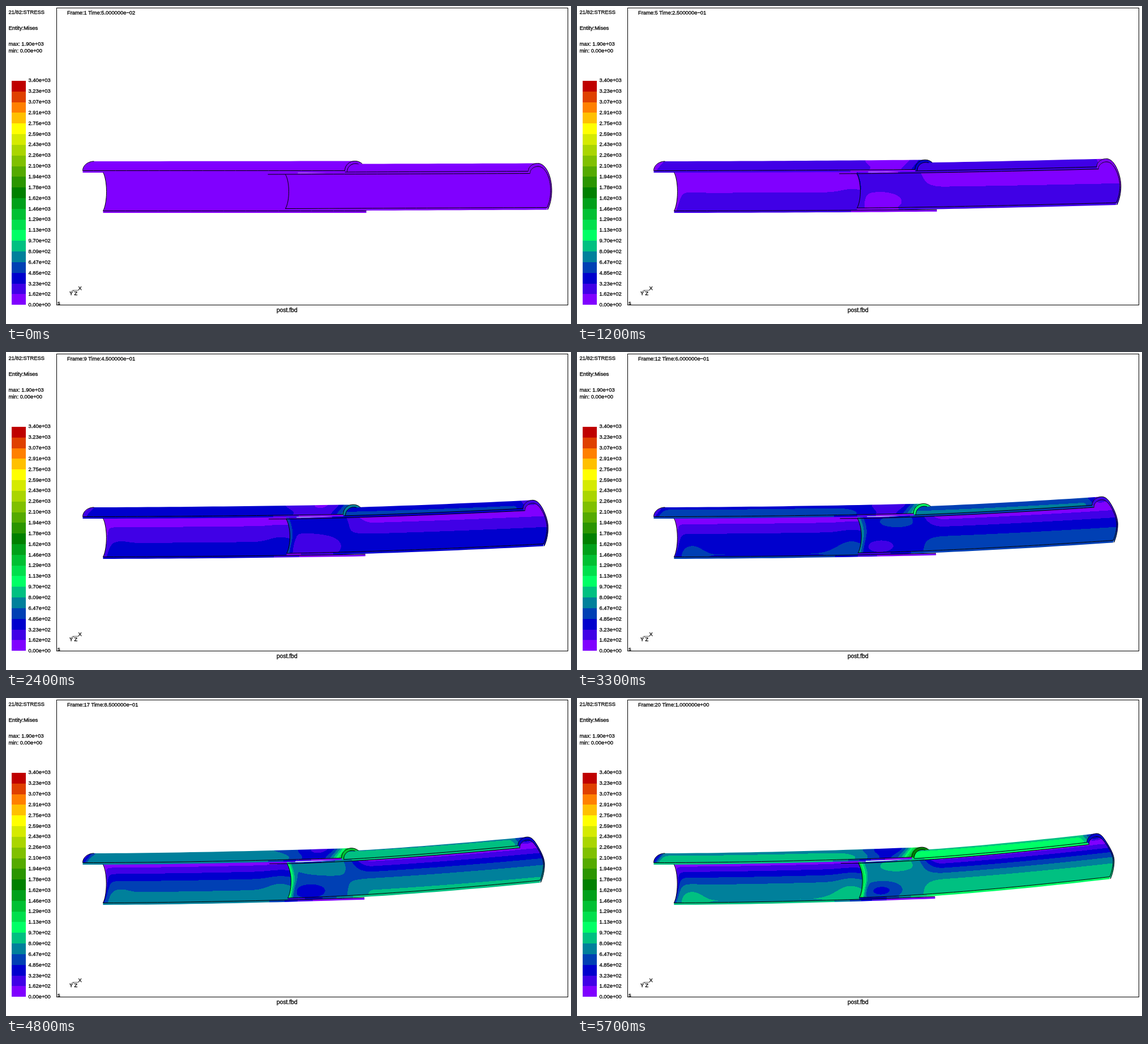
Animation of 998x561 px, one loop 6 s. Source, as an HTML page with a canvas:

```html
<!DOCTYPE html>
<html lang="en">
<head>
<meta charset="utf-8">
<title>Mises stress</title>
<style>
html, body { margin: 0; width: 100%; height: 100%; overflow: hidden; background: #fff; }
canvas, svg { position: absolute; left: 0; top: 0; width: 998px; height: 561px; }
text { font-family: "Liberation Sans", Arial, sans-serif; font-size: 9.35px; fill: #000; stroke: #000; stroke-width: .3px; }
</style>
</head>
<body>
<canvas id="view" width="998" height="561"></canvas>
<svg viewBox="0 0 998 561">
  <rect x="89.5" y="3.5" width="903" height="524" fill="none" stroke="#000"/>
  <g id="legend"></g>
  <text x="4.5" y="14">21/82:STRESS</text>
  <text x="4.5" y="42" style="font-size:9.65px">Entity:Mises</text>
  <text x="4.5" y="70.3">max: 1.90e+03</text>
  <text x="4.5" y="81.8">min: 0.00e+00</text>
  <text id="stamp" x="108" y="14.8"></text>
  <text x="478" y="539.8" style="font-size:10.3px">post.fbd</text>
  <text x="91" y="526.5">s</text>
  <path d="M114 505 L118 501.5 H128 M118 501.5 L122 505" fill="none" stroke="#333" stroke-width=".8"/>
  <g style="font-size:10px">
    <text x="127.5" y="500.5">X</text><text x="120.5" y="510">Z</text><text x="112" y="510">Y</text>
  </g>
</svg>
<script>
const STEPS = 20, STEP_MS = 300, BANDS = 21;

const view = document.getElementById('view').getContext('2d');
const scratch = document.createElement('canvas');
scratch.width = 998; scratch.height = 561;
const layer = scratch.getContext('2d');

const sci = (v, d) => v.toExponential(d).replace(/([+-])(\d)$/, '$10$2').replace('-', '\u2212');
const clamp = (x, lo, hi) => Math.min(hi, Math.max(lo, x));
const smooth = (a, b, x) => { const k = clamp((x - a) / (b - a), 0, 1); return k * k * (3 - 2 * k); };
const bell = (d, e = 0) => Math.exp(-d * d - e * e);
const quarterSine = (y, y0, h) => Math.abs(Math.sin(Math.PI / 2 * (y - y0) / h));

// Colour scale: straight blends between key bands
const KEYS = { 0: '8000ff', 2: '0000cd', 4: '00809b', 6: '00ff66', 10: '008000', 16: 'ffff00', 18: 'ff8000', 20: 'bf0000' };
const STOPS = Object.keys(KEYS).map(Number);
const channels = hex => [0, 2, 4].map(i => parseInt(hex.substr(i, 2), 16));
function bandColour(i) {
  const hi = STOPS.find(s => s >= i), lo = STOPS.filter(s => s <= i).pop();
  const a = channels(KEYS[lo]), b = channels(KEYS[hi]);
  const k = hi > lo ? (i - lo) / (hi - lo) : 0;
  return a.map((c, n) => Math.round(c + (b[n] - c) * k));
}
const RGB = Array.from({ length: BANDS }, (_, i) => bandColour(i));

// Displacement of each tube at full load
function bendLeft(x, y) {
  const s = Math.max(0, (x - 150) / 470), v = (y - 275) / 85;
  return [-s * (8 - 4 * v), -10.5 * s ** 1.7];
}
function bendRight(x, y) {
  const a = Math.max(0, (x - 493) / 447), w = smooth(.1, .65, (y - 277) / 80);
  return [3 + 2 * w + a * (7 * w - 26), -5.5 - 33 * a ** 1.42];
}

// Stress at full load, in legend bands
function leftInner(x, y) {
  const s = x - mouthX(171, y);
  const fade = 1 - .65 * Math.exp(-Math.max(0, s) / 4);
  return 5 * quarterSine(y, 288.5, 69) * fade
    + .45 * bell((x - 203) / 16, (y - 354) / 20) + .55 * bell((x - 486) / 24, (y - 343) / 36);
}
function rightInner(x, y) {
  const joint = 4.6 + .7 * bell((x - 565) / 42, (y - 303) / 14)
    - 1.9 * bell((x - 534) / 36, (y - 346) / 16)
    + 3.6 * bell((x - mouthX(493, y)) / 7);
  const bending = 5.97 * quarterSine(y, 290, 66) + 2 * bell((x - 938) / 14, (y - 282) / 8);
  const w = smooth(590, 650, x);
  return joint * (1 - w) + bending * w;
}
function leftOuter(x, y) {
  const k = x + (y - 283) * .6;
  return 4.8 + .8 * smooth(273, 288, y) - 2.8 * bell((k - 555) / 45)
    + 6 * bell((k - 612) / 23) - 3 * bell((k - 138) / 8);
}
const rightOuter = (x, y) => 5.7 + 1.25 * smooth(276, 290, y) - 3 * smooth(905, 935, x);
const rimStress = (x, y) => Math.max(2.5, 5.6 * quarterSine(Math.max(y, 294), 294, 66));
const leftFace = x => 5.2 - 4.5 * smooth(440, 570, x);
const rightFace = x => 2 + 4.3 * smooth(500, 640, x);

// Edges at rest
function arc(cx, cy, rx, ry, from, to, n = 24) {
  return Array.from({ length: n + 1 }, (_, i) => {
    const a = (from + (to - from) * i / n) * Math.PI / 180;
    return [cx + rx * Math.cos(a), cy + ry * Math.sin(a)];
  });
}
const back = edge => [...edge].reverse();
const strip = (edge, d) => [...edge, ...back(edge).map(([x, y]) => [x, y + d])];
const mouthX = (x, y) => x + 6 * (1 - ((y - 327) / 32) ** 2);
const rim = (cx, cy, left, right, up, high) =>
  [...arc(cx, cy, left, up, 180, 270), ...arc(cx, 325, right, high, 270, 405)];

const cap = arc(155, 290, 20, 16.5, 180, 270);
const archOut = arc(616, 290, 18, 17, 180, 315);
const archIn = arc(617, 292, 15, 14.5, 180, 290);
const mouth = arc(165, 327, 12, 39.3, -60, 60);
const lip = arc(487, 326.8, 12, 35, -60, 60);
const rimOut = rim(939, 291, 17, 24.5, 14, 48);
const rimIn = rim(939.5, 295, 14.5, 22, 12.5, 42.5);
const leftCut = [[135, 290], [598, 290]];
const leftFoot = [[171, 361], [636, 361]];
const rightCut = [[598, 292.5], [922, 291]];
const innerCut = [[462, 296.5], [925, 295]];
const rightFoot = [[493, 357], [955, 355]];

// Painted back to front
const PARTS = [
  [bendRight, rightOuter, [...arc(612, 294, 20, 18.5, 180, 270), [628, 278], ...arc(939, 291, 17, 14, 270, 180), [922, 293]]],
  [bendLeft, leftInner, [...mouth, [515, 362], [515, 291]]],
  [bendLeft, leftFace, strip(leftFoot, 3.5)],
  [bendRight, rightFace, strip(rightFoot, 4)],
  [bendRight, rightInner, [...lip, ...back(rimIn), [600, 294], [493, 294]]],
  [bendRight, rimStress, [...rimOut, ...back(rimIn)]],
  [bendRight, rightFace, [...rightCut, ...back(innerCut)]],
  [bendLeft, leftFace, strip(leftCut, 3.5)],
  [bendLeft, leftOuter, [...cap, ...arc(616, 290, 18, 17, 270, 180)]],
  [bendLeft, () => 10, [...archOut, ...back(archIn)]]
];
const LINES = [
  ...[cap, mouth, archOut, archIn, leftCut, leftFoot].map(e => [bendLeft, e]),
  ...[lip, rimOut, rimIn, rightCut, innerCut, rightFoot].map(e => [bendRight, e])
];

// Moves an outline, dividing long sides so they can bend
function deform(edge, bend, q) {
  const out = [];
  edge.forEach(([x, y], i) => {
    const [px, py] = edge[i ? i - 1 : 0];
    const n = Math.ceil(Math.hypot(x - px, y - py) / 20) || 1;
    for (let k = 1; k <= n; k++) {
      const u = px + (x - px) * k / n, v = py + (y - py) * k / n;
      const [dx, dy] = bend(u, v);
      out.push([u + q * dx, v + q * dy]);
    }
  });
  return out;
}

function trace(points) {
  view.beginPath();
  points.forEach(([x, y]) => view.lineTo(x + .5, y + .5));
}

function paint([bend, stress, edge], q, load) {
  const points = deform([...edge, edge[0]], bend, q);
  const xs = points.map(p => p[0]), ys = points.map(p => p[1]);
  const left = Math.floor(Math.min(...xs)) - 1, top = Math.floor(Math.min(...ys)) - 1;
  const w = Math.ceil(Math.max(...xs)) + 2 - left, h = Math.ceil(Math.max(...ys)) + 2 - top;
  const img = layer.createImageData(w, h);
  for (let j = 0, o = 0; j < h; j++) {
    for (let i = 0; i < w; i++, o += 4) {
      const x = left + i, y = top + j;
      let u = x, v = y;
      for (let k = 0; k < 3; k++) {
        const [dx, dy] = bend(u, v);
        u = x - q * dx; v = y - q * dy;
      }
      img.data.set(RGB[clamp(Math.floor(load * stress(u, v)), 0, BANDS - 1)], o);
      img.data[o + 3] = 255;
    }
  }
  layer.putImageData(img, left, top);
  view.save();
  trace(points);
  view.clip();
  view.drawImage(scratch, left, top, w, h, left, top, w, h);
  view.restore();
}

function draw(step) {
  const load = (step + 1) / STEPS, q = step / (STEPS - 1);
  view.clearRect(0, 0, 998, 561);
  PARTS.forEach(p => paint(p, q, load));
  for (const [bend, edge] of LINES) {
    trace(deform(edge, bend, q));
    view.stroke();
  }
  document.getElementById('stamp').textContent = `Frame:${step + 1} Time:${sci(load, 6)}`;
}

const bandTop = i => Math.round(527.2 - i * 18.82);
document.getElementById('legend').innerHTML = RGB.map((c, i) =>
  `<rect x="10" y="${bandTop(i + 1)}" width="25" height="${bandTop(i) - bandTop(i + 1)}" fill="rgb(${c})"/>`).join('') +
  Array.from({ length: BANDS + 1 }, (_, i) =>
    `<text x="39.5" y="${530.3 - i * 18.86}">${sci(i * 161.72, 2)}</text>`).join('');

const start = performance.now();
let shown = -1;
function tick() {
  const step = Math.floor((performance.now() - start) / STEP_MS) % STEPS;
  if (step !== shown) draw(shown = step);
  requestAnimationFrame(tick);
}
tick();
</script>
</body>
</html>
```
